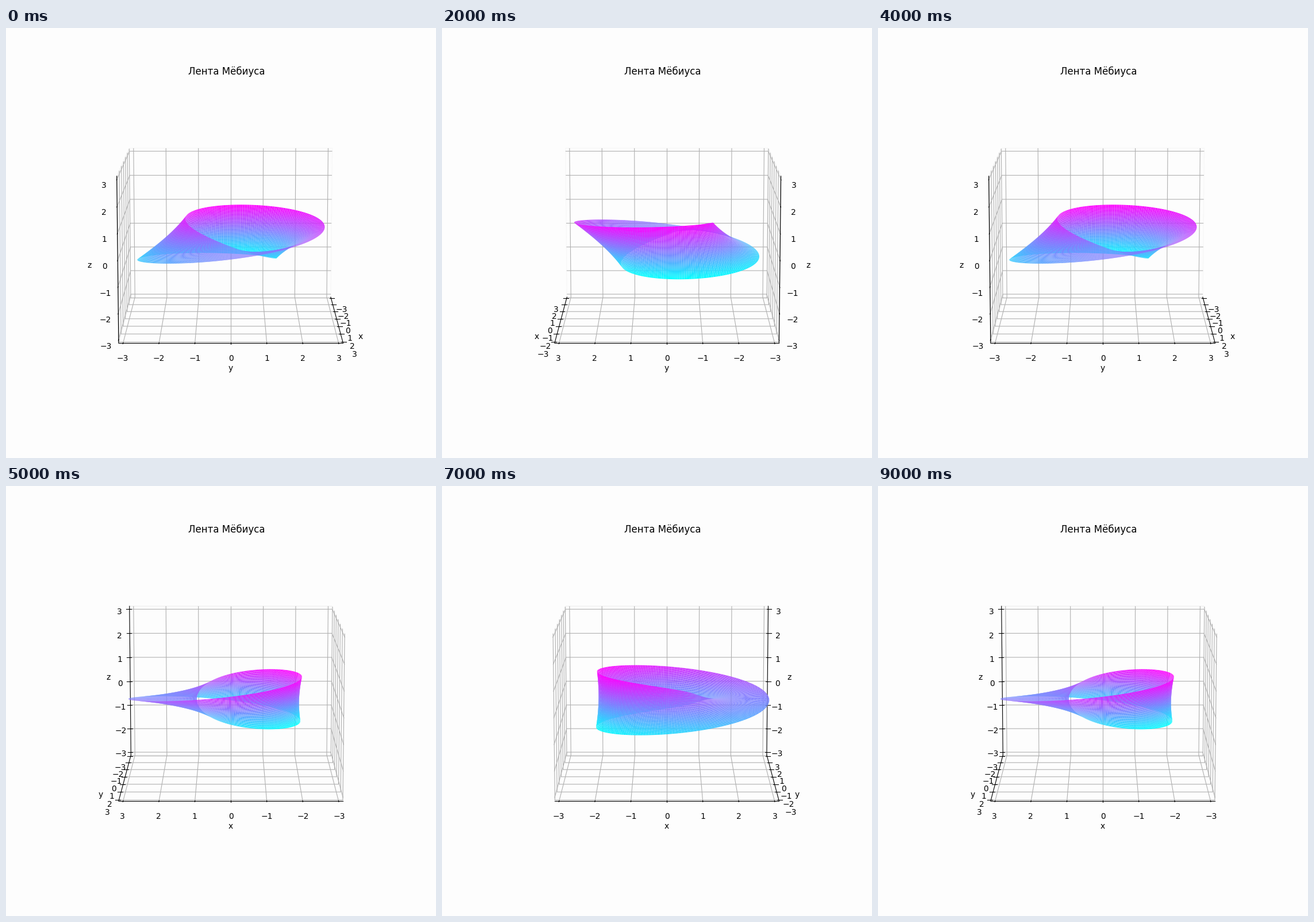
These frames come from a looping animation (748x748 px, 10000 ms). A matplotlib script:

```python
import numpy as np
import matplotlib.pyplot as plt
from matplotlib.animation import FuncAnimation

SIZE, DPI = 748, 100
FRAMES, INTERVAL = 10, 1000
RADIUS = 2
LIMIT = 3 + 6 / 48  # small margin around the outer ticks

plt.rcParams["font.family"] = "DejaVu Sans"


def mobius(nu=200, nv=50):
    u, v = np.meshgrid(np.linspace(0, 2 * np.pi, nu), np.linspace(-1, 1, nv))
    r = RADIUS + v * np.cos(u / 2)
    return r * np.cos(u), r * np.sin(u), v * np.sin(u / 2)


fig = plt.figure(figsize=(SIZE / DPI, SIZE / DPI), dpi=DPI, facecolor="#fdfdfd")
ax = fig.add_subplot(projection="3d", facecolor="#fdfdfd")
ax.set_title("Лента Мёбиуса")
ax.plot_surface(*mobius(), rstride=1, cstride=1, cmap="cool")
ax.set(xlim=(-LIMIT, LIMIT), ylim=(-LIMIT, LIMIT), zlim=(-LIMIT, LIMIT),
       xlabel="x", ylabel="y", zlabel="z")
for axis in (ax.xaxis, ax.yaxis, ax.zaxis):
    axis.pane.fill = False


def update(i):
    ax.view_init(elev=10, azim=90 * i % 360)
    return ()


anim = FuncAnimation(fig, update, frames=FRAMES, interval=INTERVAL,
                     init_func=lambda: update(0), repeat=True, repeat_delay=0)
plt.show()
```
